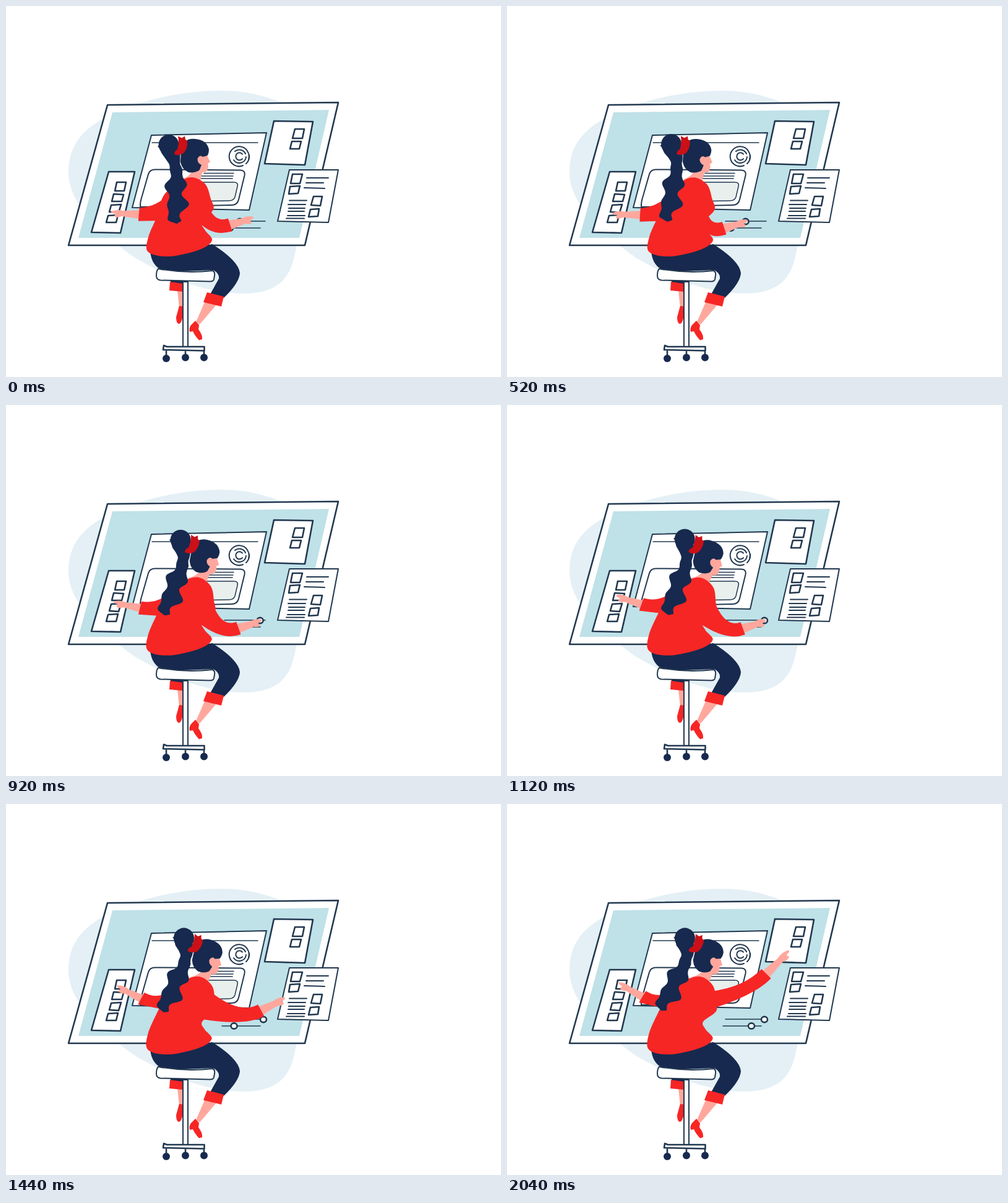
Recreate the animation shown at these times as an HTML page. Size 800x600 px, loop 2840 ms.

```html
<!DOCTYPE html>
<html lang="en">
<head>
<meta charset="utf-8">
<title>Designer at the board</title>
<style>
  html, body { margin: 0; width: 100%; height: 100%; overflow: hidden; background: #fff; }
  svg { display: block; width: 800px; height: 600px; }
  .line { fill: none; stroke: #22384f; stroke-width: 2.6; stroke-linejoin: round; stroke-linecap: round; }
  .mid { stroke-width: 2; }
  .thin { stroke-width: 1.5; }
  .card { fill: #fff; }
  .navy { fill: #17294e; }
  .red { fill: #f62625; }
  .skin { fill: #ffa79d; }
  .bow { fill: #cb1017; }
  .sleeve { stroke: #f62625; stroke-width: 1.5; stroke-linejoin: round; }
</style>
</head>
<body>
<svg viewBox="0 0 800 600">
  <path fill="#e4f0f5" d="M101 268C101 225 125 198 165 178C220 150 290 137 345 137C400 137 440 150 480 175C490 250 480 330 470 385C463 425 455 464 385 465C310 465 250 430 210 408C180 388 150 360 130 335C110 315 101 290 101 268Z"/>

  <!-- board -->
  <path class="line card" d="M164 160L537 156L483 387L101 387Z"/>
  <path fill="#bfe1e8" d="M172 172L522 168L474 375L117 375Z"/>

  <!-- page in the middle -->
  <path class="line card mid" d="M235 209L421 205L393 330L204 326Z"/>
  <g class="line thin">
    <path d="M236 221H407"/>
    <path class="mid" d="M217 322Q217 316 220 307L230 272Q232 265 240 264.500L379 265.500Q387 266 385.500 274L376 313Q374 322 364 322L217 325Z"/>
    <path fill="#e8efec" d="M296 285L368 285Q376 285 374 292L370 309Q368 315 360 315L300 316"/>
    <path d="M320 270.500H368M316 275H367M313 279H366"/>
  </g>
  <g class="line mid">
    <path d="M383 258A16 16 0 1 1 392 248M393 241A16 16 0 0 1 388 255"/>
    <path d="M370 235A11 11 0 0 1 387 239M388 244A11 11 0 0 1 368 249"/>
    <path d="M382 239.500A6 6 0 1 0 382 247"/>
  </g>

  <!-- side cards -->
  <g class="line">
    <path class="card" d="M433 186L496 187L483 257L418 255Z"/>
    <path d="M467 199H482L479 214H463ZM462 219H477L474 231H459Z"/>
    <path class="card mid" d="M458 265H537L521 350L439 348Z"/>
    <path d="M463 272H479L475 287H460ZM459 292L475 291L472 303L457 304ZM497 308H511L508 323L493 322ZM492 329L506 328L504 340L489 341Z"/>
    <path class="mid" d="M486 278H521M485 286H513M482 294L515 295M458 314.500H486M456 321H484M457 327H483M456 332H482M455 339H483M453 343.500H482"/>
    <path class="card" d="M166 268H208L185 367L138 366Z"/>
    <path d="M179 285H194L191 299H176ZM174 304L190 305L187 316H171ZM170 322L186 321L182 334L167 333ZM165 339L181 338L178 350H162Z"/>
  </g>

  <!-- sliders -->
  <path class="line thin" d="M353 348H419M349 359H411"/>
  <ellipse id="knobA" class="line card" cy="348.500" rx="5" ry="4.600"/>
  <ellipse id="knobB" class="line card" cy="359" rx="5" ry="4.600"/>

  <!-- legs and stool -->
  <path class="navy" d="M266 443H286V449H266Z"/>
  <path class="skin" d="M277 460H285L286 488H280ZM321 479L341 482L313 515L307 511Z"/>
  <path class="red" d="M265 446L286 449L285 462L264 460ZM280 485L287 486L285 505Q283 514 279 514Q275 513 275 503Z"/>
  <path class="red" d="M306 509L312 516L311 523Q318 532 317 539L312 540.500Q305 533 302 526L297 527Q295 522 299 516Z"/>
  <path class="navy" d="M233 396Q235 424 260 430L335 427Q345 432 344 441L330 466L352 472Q377 448 378 432Q376 412 333 385L318 390Z"/>
  <path class="red" d="M325 463L352 470L348 486L319 479Z"/>
  <g class="line">
    <path class="card mid" d="M246 425Q290 433 334 428Q338 430 337 436L336 442Q335 445.500 330 445.500L250 443.500Q243 443 243 436Q243 428 246 425Z"/>
    <path class="card mid" d="M286 446H294V552H286Z"/>
    <path class="card" d="M255 549L260 551H320.500V557.500L254 556ZM259 558V567M290 558V567M320 558V567"/>
  </g>
  <g class="navy"><circle cx="259" cy="570" r="6"/><circle cx="290" cy="568.500" r="6"/><circle cx="320" cy="568.500" r="6"/></g>

  <!-- figure -->
  <path id="handL" class="skin"/>
  <path id="handR" class="skin"/>
  <path id="neck" class="skin" d="M303 263L318 266L314 283L283 281Q299 275 303 263Z"/>
  <path id="armL" class="red sleeve"/>
  <path id="armR" class="red sleeve"/>
  <path id="torso" class="red"/>
  <path id="tail" class="navy"/>
  <circle id="bun" class="navy" r="16.500"/>
  <g id="head">
    <path class="navy" d="M283 228Q290 213 306 215Q325 217 328 232Q328 242 321 246L317 252L315 264Q306 271 295 269Q284 264 282 252Z"/>
    <path class="skin" d="M318 244L325 242L330 252L326 255L327 259L325 267Q318 271 312 267L316 257Q309 254 309.500 247Q313 240 318 244Z"/>
    <path class="bow" d="M278 210.500L284 213.500L289 210.500L290 216L293 218Q294 230 287 238Q279 243 272 240Q272 234 277 232Q280 222 278 210.500Z"/>
  </g>
</svg>
<script>
const LOOP = 2840, STEP = 40, END = 2040;
const WAIST = [278, 346], NAPE = [280, 250];

// Outline of the sweater, upright
const sweater = [[300, 277], [322, 288], [331, 312], [335, 329], [317, 350], [322, 363], [333, 379],
  [313, 394], [265, 405], [230, 398], [230, 374], [245, 338], [254, 308], [276, 287]];

const $ = id => document.getElementById(id);
const set = (id, attrs) => Object.entries(attrs).forEach(([k, v]) => $(id).setAttribute(k, v));
const clamp = v => Math.max(0, Math.min(1, v));
const ramp = (t, from, to) => {
  const u = clamp((t - from) / (to - from));
  return u * u * (3 - 2 * u);
};
const add = ([x, y], [dx, dy], k = 1) => [x + dx * k, y + dy * k];
const heading = deg => [Math.cos(deg * Math.PI / 180), Math.sin(deg * Math.PI / 180)];

function rotate([x, y], [cx, cy], deg) {
  const [c, s] = heading(deg);
  return [cx + (x - cx) * c - (y - cy) * s, cy + (x - cx) * s + (y - cy) * c];
}
// Leaning of the upper body, with a slight stretch upwards
const leanBy = (p, deg) => add(rotate(p, WAIST, deg), [1, -3], deg / 11);

// Closed curve through the points
function smooth(p) {
  const n = p.length, at = i => p[(i + n) % n];
  let d = "M" + p[0];
  for (let i = 0; i < n; i++) {
    const [a, b, c, e] = [at(i - 1), at(i), at(i + 1), at(i + 2)];
    d += `C${add(b, [c[0] - a[0], c[1] - a[1]], 1 / 6)} ${add(c, [b[0] - e[0], b[1] - e[1]], 1 / 6)} ${c}`;
  }
  return d + "Z";
}

// Wavy ponytail: a swaying centre line with a pulsing width, bent at the nape
function drawTail(lean, swing) {
  const left = [], right = [], root = add(leanBy(NAPE, lean), [0, -4], lean / 11);
  const wave = (y, peak, period) => Math.cos(2 * Math.PI * (y - peak) / period);
  const bend = (x, y) => add(
    rotate([x, y], NAPE, lean + (swing - lean) * clamp((y - 240) / 20)),
    [root[0] - NAPE[0], root[1] - NAPE[1]]);
  for (let y = 226; y <= 352; y += 4.2) {
    const s = clamp((y - 250) / 102);
    const mid = 275 - 13 * clamp((262 - y) / 36) + 4.5 * s * wave(y, 319, 42);
    const full = 8 + 7 * clamp((258 - y) / 20) + clamp((y - 256) / 30) * (6 + 4 * wave(y, 290, 31));
    const half = full * Math.sqrt(1 - s ** 10);
    left.push(bend(mid - half, y));
    right.unshift(bend(mid + half, y));
  }
  set("tail", { d: smooth([...left, ...right]) });
  const [cx, cy] = bend(263, 224.5);
  set("bun", { cx, cy });
}

// Forearm and hand, starting in the middle of the cuff
function drawHand(id, cuff, deg, reach, side) {
  set(id, {
    d: "M-3 -8L24 -4Q32 -6 40 -2Q44 0 41 2L35 3L37 7Q34 11 26 6L-3 8Z",
    transform: `translate(${cuff}) rotate(${deg}) scale(${reach / 42} ${side})`
  });
}

function drawRightArm(lean, pull, slide, out, raise) {
  const cuff = [361.5 - 18.5 * pull + 37.5 * slide + 38 * out, 354 + 5 * pull + 2.5 * slide - 86.5 * raise];
  const deg = -18 - 2 * slide - 26 * raise, dir = heading(deg), side = [-dir[1], dir[0]];
  const top = add(cuff, side, -10), low = add(cuff, side, 10), bend = -(31 + 9 * raise);
  const shoulder = leanBy([320, 298], lean), armpit = add(leanBy([312, 349], lean), [6, -18], raise);
  set("armR", { d: `M${shoulder}Q${add(top, dir, bend)} ${top}L${low}Q${add(low, dir, bend)} ${armpit}Z` });
  drawHand("handR", cuff, deg, 40 + 13 * raise, 1);
}

function drawLeftArm(lean, pull, lift) {
  const cuff = [215.5 + 4 * lift, 337 + 3 * pull - 28 * lift];
  const tip = [170 + 11 * lift, 333 + 6 * pull - 50 * lift];
  const dx = tip[0] - cuff[0], dy = tip[1] - cuff[1], reach = Math.hypot(dx, dy);
  const side = [-dy / reach, dx / reach];
  const top = add(cuff, side, 10), low = add(cuff, side, -10);
  const bend = [0.3 * top[0] + 180.6, 0.3 * top[1] + 227.5];
  set("armL", { d: `M${leanBy([266, 302], lean)}Q${bend} ${top}L${low}L258 ${0.6 * low[1] + 138}Z` });
  drawHand("handL", cuff, Math.atan2(dy, dx) * 180 / Math.PI, reach, -0.9);
}

function render(t) {
  const lean = 11 * ramp(t, 360, 1160);
  const swing = 1.5 * ramp(t, 0, 280) + 18.5 * ramp(t, 280, 760) + 7 * ramp(t, 1120, 1720);
  const pull = ramp(t, 0, 280), slide = ramp(t, 280, 1120);

  set("knobA", { cx: 378 + 38 * slide });
  set("knobB", { cx: 362 + 33 * ramp(t, 1200, END) });

  const q = lean / 11, transform = `translate(${q} ${-3 * q}) rotate(${lean} ${WAIST})`;
  set("head", { transform });
  set("neck", { transform });
  set("torso", { d: smooth(sweater.map(p => leanBy(p, lean * clamp((385 - p[1]) / 70)))) });

  drawTail(lean, swing);
  drawRightArm(lean, pull, slide, ramp(t, 1120, 1560), ramp(t, 1140, 1940));
  drawLeftArm(lean, pull, ramp(t, 280, 1720));
}

const start = performance.now();
function frame() {
  const t = (performance.now() - start) % LOOP;
  render(Math.min(Math.floor(t / STEP) * STEP, END));
  requestAnimationFrame(frame);
}
frame();
</script>
</body>
</html>
```
